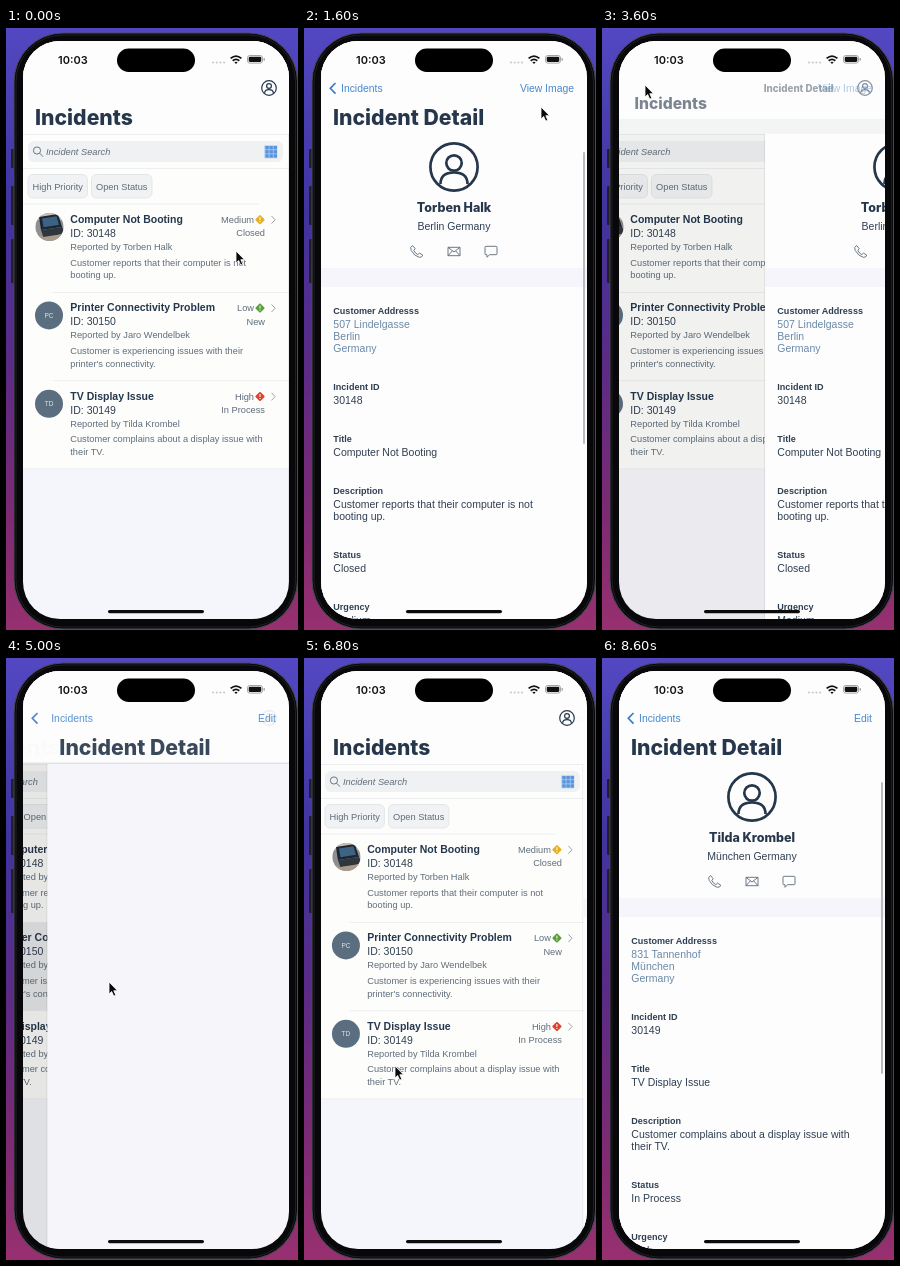
Recreate the animation shown at these times as an HTML page. Size 292 by 602 pixels, loop 9000 ms.

```html
<!DOCTYPE html>
<html lang="en">
<head>
<meta charset="utf-8">
<title>Incidents</title>
<style>
  html, body { margin: 0; width: 100%; height: 100%; overflow: hidden; background: #4034a0; }
  svg { display: block; width: 292px; height: 602px; }
  text { font: 9.25px "Liberation Sans", Arial, sans-serif; fill: #5f6d7b; white-space: pre; }
  .heavy { font: 800 21.2px Inter, sans-serif; fill: #26374c; }
  .name { font-size: 12.5px; text-anchor: middle; }
  .head { font-size: 10.5px; font-weight: 700; fill: #26374c; }
  .value { font-size: 10.5px; fill: #2f3f52; }
  .label { font-size: 9.05px; font-weight: 700; fill: #2f3f52; }
  .street { fill: #6a89a8; }
  .link { font-size: 10.4px; fill: #4688cc; }
  .hint { font-style: italic; }
  .end { text-anchor: end; }
  .mid { text-anchor: middle; }
  .initials { font-size: 6.5px; fill: #dbe2e8; text-anchor: middle; }
  .clock { font: 600 11px Inter, sans-serif; fill: #111; }
  .line { fill: none; stroke: #26374c; }
  .thin { fill: none; stroke: #5c6a7a; stroke-width: .9; stroke-linejoin: round; }
  .rule { fill: #eaecee; }
</style>
</head>
<body>
<svg viewBox="0 0 292 602">
  <defs>
    <linearGradient id="wall" x2="0" y2="1">
      <stop offset="0" stop-color="#5348c2"/>
      <stop offset=".3" stop-color="#4034a0"/>
      <stop offset=".55" stop-color="#5a2b86"/>
      <stop offset=".8" stop-color="#7c2a74"/>
      <stop offset="1" stop-color="#98306f"/>
    </linearGradient>
    <clipPath id="screen"><rect x="17" y="13" width="266" height="578" rx="37"/></clipPath>
    <clipPath id="round"><circle cx="43.5" cy="199" r="14"/></clipPath>
  </defs>

  <rect width="292" height="602" fill="url(#wall)"/>
  <g fill="#20202a">
    <rect x="5" y="121" width="4" height="19" rx="1"/>
    <rect x="5" y="158" width="4" height="39" rx="1"/>
    <rect x="5" y="211" width="4" height="44" rx="1"/>
  </g>
  <rect x="8" y="5" width="283.5" height="596" rx="49" fill="#08080a" stroke="#4a4a54"/>
  <rect x="10" y="7" width="279.5" height="592" rx="47" fill="none" stroke="#1e1e24"/>

  <g clip-path="url(#screen)">
    <g id="list"></g>
    <rect id="dim" x="17" y="13" width="266" height="578"/>
    <g id="detail">
      <rect x="16" y="13" width="1" height="578" fill="#000" opacity=".07"/>
      <rect x="17" y="13" width="266" height="578" fill="#f5f5fa"/>
      <g id="pages"></g>
    </g>
    <rect x="17" y="13" width="266" height="93" fill="#fdfdfd"/>
    <rect id="strip" x="17" y="91" width="266" height="15" fill="#f3f4f4"/>
    <rect id="edge" x="17" y="104.5" width="266" height="1.5" fill="#e1e3e6"/>

    <g id="listTitle"><text class="heavy">Incidents</text></g>
    <g id="person" class="line" stroke-width="1.2">
      <circle cx="263" cy="60" r="7.3"/>
      <circle cx="263" cy="58" r="2.4"/>
      <path d="M258.6 65.5q0-3.8 4.4-3.8t4.4 3.8"/>
    </g>
    <g id="detailTitle"><text class="heavy">Incident Detail</text></g>
    <path id="chevron" d="M31.5 55l-5.2 5.3 5.2 5.3" fill="none" stroke="#3b7fc6" stroke-width="1.7"/>
    <text id="back" class="link" y="64">Incidents</text>
    <text id="action" class="link end" x="270" y="64"></text>

    <text class="clock" x="52" y="35.5">10:03</text>
    <rect x="111" y="20.5" width="78" height="23.5" rx="11.7"/>
    <g fill="#c4c6c9">
      <circle cx="207" cy="34.5" r="1"/><circle cx="210.7" cy="34.5" r="1"/>
      <circle cx="214.4" cy="34.5" r="1"/><circle cx="218.1" cy="34.5" r="1"/>
    </g>
    <g fill="none" stroke="#111" stroke-width="1.8">
      <path d="M224.6 30.4q5.4-4.6 10.8 0M226.7 32.8q3.3-2.8 6.6 0"/>
      <path d="M230 36l-1.6-1.7q1.6-1.2 3.2 0z" fill="#111" stroke="none"/>
    </g>
    <rect x="241.5" y="27.5" width="15" height="7.6" rx="2.3" fill="none" stroke="#9a9a9c" stroke-width=".9"/>
    <rect x="242.7" y="28.7" width="12.6" height="5.2" rx="1.3" fill="#111"/>
    <rect x="257.6" y="30" width="1.2" height="2.8" rx=".6" fill="#9a9a9c"/>
    <rect x="102" y="582" width="96" height="3.2" rx="1.6" fill="#0b0b0c"/>
  </g>

  <path id="cursor" d="M0 0v12l2.7-2.5 2 4.6 2.1-.9-2-4.5h3.7z" fill="#0a0a0a" stroke="#fff" stroke-width=".8"/>
</svg>

<script>
const incidents = [
  { title: "Computer Not Booting", id: 30148, who: "Torben Halk", city: "Berlin", street: "507 Lindelgasse",
    level: "Medium", color: "#e9ae22", status: "Closed", action: "View Image",
    note: ["Customer reports that their computer is not", "booting up."] },
  { title: "Printer Connectivity Problem", id: 30150, who: "Jaro Wendelbek", city: "Frankfurt", street: "264 Wiesenhagen",
    level: "Low", color: "#5a9e38", status: "New", action: "Edit", initials: "PC",
    note: ["Customer is experiencing issues with their", "printer's connectivity."],
    wide: ["Customer is experiencing issues with their printer's", "connectivity."] },
  { title: "TV Display Issue", id: 30149, who: "Tilda Krombel", city: "München", street: "831 Tannenhof",
    level: "High", color: "#e0402f", status: "In Process", action: "Edit", initials: "TD",
    note: ["Customer complains about a display issue with", "their TV."] }
];

// dir 1 opens a detail page, dir -1 returns to the list
const moves = [
  { at: 620, dir: 1, page: 0 }, { at: 3508, dir: -1, page: 0 },
  { at: 4800, dir: 1, page: 1 }, { at: 6485, dir: -1, page: 1 },
  { at: 7290, dir: 1, page: 2 }
];

// time, x, y of the pointer tip
const path = [
  [0, 230, 223], [900, 230, 223], [1600, 237, 79], [2400, 237, 79], [3300, 43, 57],
  [3700, 43, 57], [4500, 103, 324], [5200, 103, 324], [6100, 43, 58], [6400, 43, 58],
  [6800, 91, 408], [7500, 91, 408], [8200, 60, 620]
];

const LOOP = 9000, STEP = 200, LAST = 8600, WIDTH = 266;
const $ = id => document.getElementById(id);
const text = (cls, x, y, s) => `<text class="${cls}" x="${x}" y="${y}">${s}</text>`;
const box = (x, y, w, h, fill, more = "") =>
  `<rect x="${x}" y="${y}" width="${w}" height="${h}" fill="${fill}" ${more}/>`;
const lerp = (a, b, k) => a + (b - a) * k;

function photo() {
  return `<g clip-path="url(#round)">
    ${box(29, 185, 29, 29, "#8d8f90")}${box(29, 185, 29, 7, "#c7bfb2")}
    <path d="M33 189l19-3 4 13-21 3z" fill="#1c2733"/>
    <path d="M36 190.5l14.500-2.300 2.500 8.500-15.500 2.500z" fill="#3d6384"/>
    <path d="M35 202l21-3 3 6-21 6z" fill="#30363d"/>
    <path d="M29 205l8 4 20-3v9h-28z" fill="#a99a8b"/></g>`;
}

function row(d, i) {
  const y = 176 + 88.4 * i;
  const avatar = d.initials
    ? `<circle cx="43" cy="${y + 23}" r="14" fill="#5b6e80"/>` + text("initials", 43, y + 25.4, d.initials)
    : photo();
  return box(17, y, WIDTH, 88.4, "#fdfdfb", `id="row${i}"`) +
    `<rect class="rule" x="${i ? 47 : 17}" y="${y - .4}" width="236" height=".8"/>` + avatar +
    text("head", 64.3, y + 19, d.title) + text("value", 64.3, y + 33, "ID: " + d.id) +
    text("", 64.3, y + 46, "Reported by " + d.who) +
    d.note.map((s, n) => text("", 64.3, y + 61.5 + 12.6 * n, s)).join("") +
    text("end", 248, y + 19, d.level) + text("end", 259, y + 32.3, d.status) +
    `<g transform="translate(254 ${y + 15.7})"><rect x="-3.500" y="-3.500" width="7" height="7" rx="1"
      transform="rotate(45)" fill="${d.color}"/>
      <path d="M0-2.500v3M0 1.500v1" stroke="#fff" stroke-width="1"/></g>
    <path d="M265.500 ${y + 12}l3.600 3.800-3.600 3.800" fill="none" stroke="#9ba5af"/>`;
}

function chip(x, w, s) {
  return box(x, 146.5, w, 23.5, "#f0f2f3", 'rx="5" stroke="#dfe3e6" stroke-width=".8"') +
    text("mid", x + w / 2, 161.5, s);
}

function listView() {
  let scan = "";
  for (let i = 0; i < 9; i++)
    scan += box(259.3 + i % 3 * 4.1, 118 + Math.floor(i / 3) * 4.1, 3.5, 3.5, "#5b94da");
  return box(17, 13, WIDTH, 578, "#f5f6fb") + box(17, 13, WIDTH, 163, "#fdfdfc") +
    `<rect class="rule" x="17" y="106" width="266" height=".8"/>
    <rect class="rule" x="17" y="140" width="266" height=".8"/>` +
    box(22, 113, 255, 21, "#eff1f3", 'rx="6"') +
    `<circle class="thin" cx="31" cy="122.500" r="3.600"/><path class="thin" d="M33.700 125.200l3.300 3.500"/>` +
    text("hint", 40, 127, "Incident Search") +
    box(258, 117, 13.5, 13.5, "#c4dbf5", 'rx="1"') + scan +
    chip(22, 59.5, "High Priority") + chip(85.5, 60.5, "Open Status") +
    incidents.map(row).join("") + `<rect class="rule" x="17" y="440.500" width="266" height=".8"/>`;
}

function field(y, label, lines, cls = "") {
  return text("label", 29.3, y, label) +
    lines.map((s, n) => text("value " + cls, 29.3, y + 13.5 + 12 * n, s)).join("");
}

function page(d, i) {
  return `<g id="page${i}">` + box(17, 106, WIDTH, 485, "#fdfdfd") + box(17, 240, WIDTH, 19, "#f5f5fb") +
    `<g class="line" stroke-width="2.700"><circle cx="150" cy="139" r="23.600"/>
      <circle cx="150" cy="135" r="7.700"/><path d="M136.500 156q0-11.500 13.500-11.500t13.500 11.500"/></g>` +
    text("heavy name", 150, 184, d.who) + text("value mid", 150, 202, d.city + " Germany") +
    `<path class="thin" d="M108.500 217.500q-3 1.500-1.300 5 3 5.500 8 6.800 3 .4 3.500-2.200l-3.200-2-1.700 1.500q-2.800-1.200-4-4.300l1.400-1.600z"/>
    <path class="thin" d="M144 219.300h12v8.400h-12zl6 4.700 6-4.700M144 227.700l4.300-4.800M156 227.700l-4.300-4.800"/>
    <path class="thin" d="M182 218.300h10q1 0 1 1v6.400q0 1-1 1h-6.500l-2.500 2.600v-2.600h-1q-1 0-1-1v-6.400q0-1 1-1z"/>` +
    field(286, "Customer Addresss", [d.street, d.city, "Germany"], "street") +
    field(362, "Incident ID", [d.id]) + field(414, "Title", [d.title]) +
    field(466, "Description", d.wide || d.note) + field(530, "Status", [d.status]) +
    field(582, "Urgency", [d.level]) +
    box(279, 124, 2, 292, "#b9bbc0", 'rx="1"') + `</g>`;
}

const spring = ms => {
  const s = Math.max(0, ms) / 50;
  return 1 - (1 + s) * Math.exp(-s);
};

const place = (id, x, y = 0, k = 1) => $(id).setAttribute("transform", `translate(${x} ${y}) scale(${k})`);
const fade = (id, a) => $(id).setAttribute("opacity", a);

function pointer(t) {
  let i = path.findIndex(p => p[0] > t);
  if (i < 0) i = path.length;
  const a = path[i - 1], b = path[i] || a;
  const k = b === a ? 0 : (t - a[0]) / (b[0] - a[0]), e = k * k * (3 - 2 * k);
  place("cursor", lerp(a[1], b[1], e), lerp(a[2], b[2], e));
}

function draw(t) {
  const move = moves.filter(m => m.at <= t).pop() || { at: -9000, dir: -1, page: 0 };
  const next = moves.find(m => m.at > t);
  let k = spring(t - move.at);
  if (k > .998) k = 1;
  const opening = move.dir > 0, p = opening ? k : 1 - k;
  const lead = next ? next.at - t : LOOP;
  const loaded = !opening || t - move.at > 300;

  place("list", -.3 * WIDTH * p);
  fade("dim", .1 * p);
  place("detail", WIDTH * (1 - p));
  incidents.forEach((d, i) => {
    $("page" + i).style.display = loaded && i === move.page ? "" : "none";
    const pressed = opening ? i === move.page : next && i === next.page && lead < 110;
    $("row" + i).setAttribute("fill", pressed ? "#e9eaec" : "#fdfdfb");
  });

  const popping = !opening && k < .95;
  fade("strip", popping ? 1 : 0);
  fade("edge", opening && !loaded ? 1 : 0);
  fade("person", 1 - p);
  fade("action", p);
  $("action").textContent = incidents[move.page].action;

  const touch = opening && lead < 110;
  fade("back", opening ? (touch ? .25 : p) : 0);
  fade("chevron", opening ? (touch ? .5 : p) : 0);
  $("back").setAttribute("x", 37 + 90 * (1 - p));

  if (opening) {
    place("listTitle", 29 - 80 * p, 97);
    fade("listTitle", (1 - p) ** 2);
    place("detailTitle", 29 + WIDTH * (1 - p), 97);
    fade("detailTitle", p);
  } else {
    const h = Math.min(1, k / .55);
    place("listTitle", lerp(37, 29, k), lerp(62, 97, k), lerp(.42, 1, k));
    fade("listTitle", Math.min(1, k * 1.1));
    place("detailTitle", 29 + 133 * k / .55, 97 - 33 * h, 1 - .54 * h);
    fade("detailTitle", 1 - k);
  }
  pointer(t);
}

$("list").innerHTML = listView();
$("pages").innerHTML = incidents.map(page).join("");

const start = performance.now();
function tick() {
  const t = Math.max(0, performance.now() - start) % LOOP;
  draw(Math.min(LAST, Math.floor(t / STEP) * STEP));
  requestAnimationFrame(tick);
}
tick();
</script>
</body>
</html>
```
